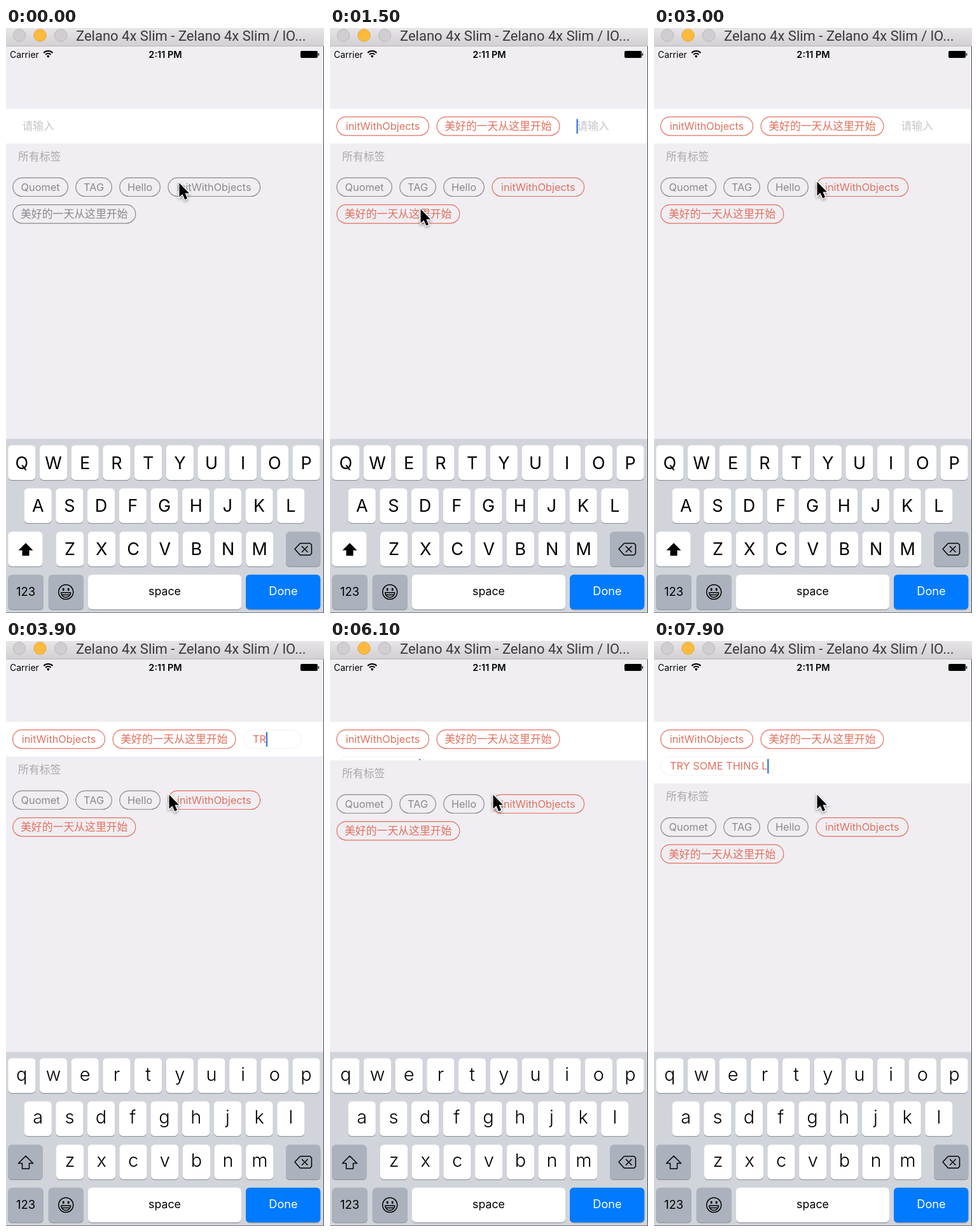
An HTML page with a canvas for the animation above (8000 ms loop, 500 by 919 pixels).

```html
<!DOCTYPE html>
<html lang="en">
<head>
<meta charset="utf-8">
<title>Tag input</title>
<style>
html, body { margin: 0; width: 100%; height: 100%; overflow: hidden; background: #f0eef2; }
canvas { display: block; width: 500px; height: 919px; }
</style>
</head>
<body>
<canvas id="stage"></canvas>
<script>
const W = 500, H = 919, LOOP = 8000, STEP = 100;
const canvas = document.getElementById('stage');
const dpr = window.devicePixelRatio || 1;
canvas.width = W * dpr;
canvas.height = H * dpr;
const c = canvas.getContext('2d');

const LATIN = 'Inter, Roboto, sans-serif';
const CJK = '"Noto Sans CJK SC", "Noto Sans CJK JP", "Noto Sans CJK", sans-serif';
const RED = '#e2705f', GREY = '#8a888b', BLUE = '#3c7be4';
const ROW = 42.3;
const LONG = '美好的一天从这里开始', OBJ = 'initWithObjects';

const TYPED = 'TRY SOME THING L';
const KEY_TIMES = [3400, 3700, 4100, 4500, 4900, 5200, 5400, 5500,
                   5600, 5800, 5900, 6000, 6200, 6400, 7200, 7700];
const PICK_OBJ = 300, PICK_LONG = 1300, WRAP = 6000, GROW = 6020;

// time, x, y of the pointer tip
const PATH = [[0, 272, 243], [400, 272, 243], [700, 164, 267], [1000, 142, 284],
              [1500, 142, 284], [2100, 256, 241], [8000, 256, 241]];

const clamp = v => Math.max(0, Math.min(1, v));
const ease = p => p < 0.5 ? 2 * p * p : 1 - 2 * (1 - p) * (1 - p);

function text(s, x, y, size, color, align = 'left', weight = 400, family = LATIN) {
  c.font = `${weight} ${size}px ${family}`;
  c.textAlign = align;
  c.fillStyle = color;
  c.fillText(s, x, y);
}
const han = (s, x, y, color) => text(s, x, y, 16.85, color, 'left', 300, CJK);

function rect(x, y, w, h, color) {
  c.fillStyle = color;
  c.fillRect(x, y, w, h);
}

function box(x, y, w, h, r) {
  c.beginPath();
  c.roundRect(x, y, w, h, r);
}

function poly(points, x = 0, y = 0) {
  c.beginPath();
  points.forEach(([px, py]) => c.lineTo(x + px, y + py));
  c.closePath();
}

function disc(x, y, r, fill, edge) {
  c.beginPath();
  c.arc(x, y, r, 0, Math.PI * 2);
  c.fillStyle = fill;
  c.fill();
  c.strokeStyle = edge;
  c.lineWidth = 1;
  c.stroke();
}

function pill(x, y, w, color, width = 1.2) {
  box(x, y, w, 29.2, 14.6);
  c.strokeStyle = color;
  c.lineWidth = width;
  c.stroke();
}

function tag(s, x, y, w, color) {
  pill(x, y, w, color);
  if (s === LONG) han(s, x + 12.2, y + 20.8, color);
  else text(s, x + w / 2, y + 20.5, 16.3, color, 'center');
}

function titleBar() {
  const g = c.createLinearGradient(0, 0, 0, 28);
  g.addColorStop(0, '#e7e5e7');
  g.addColorStop(1, '#d2d0d2');
  rect(0, 0, W, 28, g);
  rect(0, 28, W, 1, '#b9b7b9');
  disc(21, 11.5, 9.7, '#d0ced0', '#b9b7b9');
  disc(53.5, 11.5, 9.7, '#fdba3c', '#e5a53a');
  disc(86, 11.5, 9.7, '#d0ced0', '#b9b7b9');
  text('Zelano 4x Slim - Zelano 4x Slim / lO...', 110, 20, 22, '#3a383a', 'left', 400, 'Roboto, sans-serif');
}

function statusBar() {
  text('Carrier', 6, 47, 14, '#000');
  text('2:11 PM', 250.5, 47, 14.5, '#000', 'center', 600);
  c.strokeStyle = '#000';
  c.lineWidth = 2;
  for (const r of [6, 10]) {
    c.beginPath();
    c.arc(66.3, 46, r, -Math.PI * 0.75, -Math.PI * 0.25);
    c.stroke();
  }
  c.beginPath();
  c.moveTo(66.3, 47);
  c.arc(66.3, 46, 3, -Math.PI * 0.78, -Math.PI * 0.22);
  c.fillStyle = '#000';
  c.fill();
  box(463, 36, 27, 11, 2);
  c.fill();
  rect(490.8, 39.5, 1.4, 4, '#000');
}

function caret(x, y) {
  rect(x, y, 2.4, 23, BLUE);
}

function inputField(t, height) {
  rect(0, 127, W, height, '#fff');
  c.save();
  c.beginPath();
  c.rect(0, 127, W, height);
  c.clip();
  let left = 10.5;
  if (t >= PICK_OBJ) {
    tag(OBJ, 10.5, 139.6, 145, RED);
    left = 168;
  }
  if (t >= PICK_LONG) {
    tag(LONG, 168, 139.6, 193, RED);
    left = 373.5;
  }
  const count = KEY_TIMES.filter(k => k <= t).length;
  if (count) {
    const wrapped = t >= WRAP;
    const x = wrapped ? 10.5 : left, y = 139.6 + (wrapped ? ROW : 0);
    const s = TYPED.slice(0, count);
    c.font = `400 16.3px ${LATIN}`;
    const w = c.measureText(s).width;
    pill(x, y, Math.max(91, w + 26), '#f1f0f2', 1);
    text(s, x + 14.5, y + 20.5, 16.3, RED);
    caret(x + 14.3 + w, y + 3.4);
  } else {
    han('请输入', left + 15, 160.2, '#c6c5ca');
    if ((t + 850) % 1000 < 500) caret(left + 14, 143);
  }
  c.restore();
}

function tagList(t, dy) {
  han('所有标签', 19, 208 + dy, '#a9a7aa');
  const y = 235.3 + dy;
  tag('Quomet', 10.8, y, 86.5, GREY);
  tag('TAG', 109.8, y, 56.5, GREY);
  tag('Hello', 178.8, y, 63.5, GREY);
  tag(OBJ, 255, y, 144.6, t >= PICK_OBJ ? RED : GREY);
  tag(LONG, 10.8, y + ROW, 193, t >= PICK_LONG ? RED : GREY);
}

function key(x, y, w, fill = '#fff') {
  box(x, y + 1.3, w, 54.5, 6);
  c.fillStyle = '#93979d';
  c.fill();
  box(x, y, w, 54.5, 6);
  c.fillStyle = fill;
  c.fill();
}

function shiftIcon(upper) {
  poly([[0, -10.5], [11.5, 1], [5.5, 1], [5.5, 9.5], [-5.5, 9.5], [-5.5, 1], [-11.5, 1]], 31, 819.5);
  c.lineJoin = 'round';
  c.lineWidth = 1.5;
  c.strokeStyle = c.fillStyle = '#000';
  if (upper) c.fill();
  else c.stroke();
}

function deleteIcon() {
  c.strokeStyle = '#000';
  c.lineWidth = 1.5;
  c.lineJoin = 'round';
  poly([[454, 818.5], [462.5, 809.5], [478, 809.5], [480.5, 812], [480.5, 825.5], [478, 828], [462.5, 828]]);
  c.stroke();
  c.beginPath();
  c.moveTo(465, 814);
  c.lineTo(474.5, 823.5);
  c.moveTo(474.5, 814);
  c.lineTo(465, 823.5);
  c.stroke();
}

function smiley(x, y) {
  c.strokeStyle = '#000';
  c.lineWidth = 1.5;
  c.beginPath();
  c.arc(x, y, 11.5, 0, Math.PI * 2);
  c.stroke();
  c.beginPath();
  c.arc(x, y + 1, 7.5, 0, Math.PI);
  c.closePath();
  c.stroke();
  c.beginPath();
  c.moveTo(x - 6.5, y + 4.5);
  c.lineTo(x + 6.5, y + 4.5);
  c.stroke();
  c.fillStyle = '#000';
  for (const dx of [-4, 4]) {
    c.beginPath();
    c.ellipse(x + dx, y - 4, 1.5, 2.3, 0, 0, Math.PI * 2);
    c.fill();
  }
}

function keyboard(upper) {
  const dark = '#abb2bd';
  rect(0, 645.5, W, H - 645.5, '#d1d5db');
  const rows = [['QWERTYUIOP', 3.2, 655.5], ['ASDFGHJKL', 28.6, 723.3], ['ZXCVBNM', 79, 791.2]];
  for (const [letters, x0, y] of rows) {
    [...letters].forEach((ch, i) => {
      const x = x0 + i * 49.7;
      key(x, y, 43.2);
      if (upper) text(ch, x + 21.6, y + 37, 27, '#000', 'center');
      else text(ch.toLowerCase(), x + 21.6, y + 35, 29, '#000', 'center', 300);
    });
  }
  key(3.2, 791.2, 54.4, upper ? '#fff' : dark);
  shiftIcon(upper);
  key(440, 791.2, 54.3, dark);
  deleteIcon();
  const y = 858.8;
  key(3.2, y, 55.8, dark);
  text('123', 31, y + 33.4, 18.5, '#000', 'center');
  key(66.8, y, 55.2, dark);
  smiley(94.2, 886);
  key(129, y, 241, '#fff');
  text('space', 249.5, y + 32, 17.8, '#000', 'center');
  key(377, y, 117.3, '#007aff');
  text('Done', 436, y + 32, 18.2, '#fff', 'center');
}

function pointer(t) {
  let i = 0;
  while (i < PATH.length - 2 && t >= PATH[i + 1][0]) i++;
  const [t0, x0, y0] = PATH[i], [t1, x1, y1] = PATH[i + 1];
  const p = clamp((t - t0) / (t1 - t0));
  const x = x0 + (x1 - x0) * p, y = y0 + (y1 - y0) * p;
  poly([[0, 0.5], [0, 22.5], [5, 18], [8.7, 26.5], [12.6, 24.8], [9, 16.6], [15.5, 16.4]], x + 0.5, y);
  c.save();
  c.shadowColor = 'rgba(0,0,0,.4)';
  c.shadowBlur = 4 * dpr;
  c.shadowOffsetY = 2 * dpr;
  c.lineJoin = 'miter';
  c.strokeStyle = '#fff';
  c.lineWidth = 2.6;
  c.stroke();
  c.restore();
  c.fillStyle = '#000';
  c.fill();
}

function draw(t) {
  c.setTransform(dpr, 0, 0, dpr, 0, 0);
  rect(0, 0, W, H, '#f0eef2');
  const dy = ROW * ease(clamp((t - GROW) / 300));
  inputField(t, 54.3 + dy);
  tagList(t, dy);
  keyboard(t < KEY_TIMES[0]);
  titleBar();
  statusBar();
  rect(499, 29, 1, H - 29, '#4a484a');
  rect(0, 918, W, 1, '#77797d');
  pointer(t);
}

const start = performance.now();
function tick() {
  const t = (performance.now() - start) % LOOP;
  draw(Math.floor(t / STEP) * STEP);
  requestAnimationFrame(tick);
}
tick();
</script>
</body>
</html>
```
